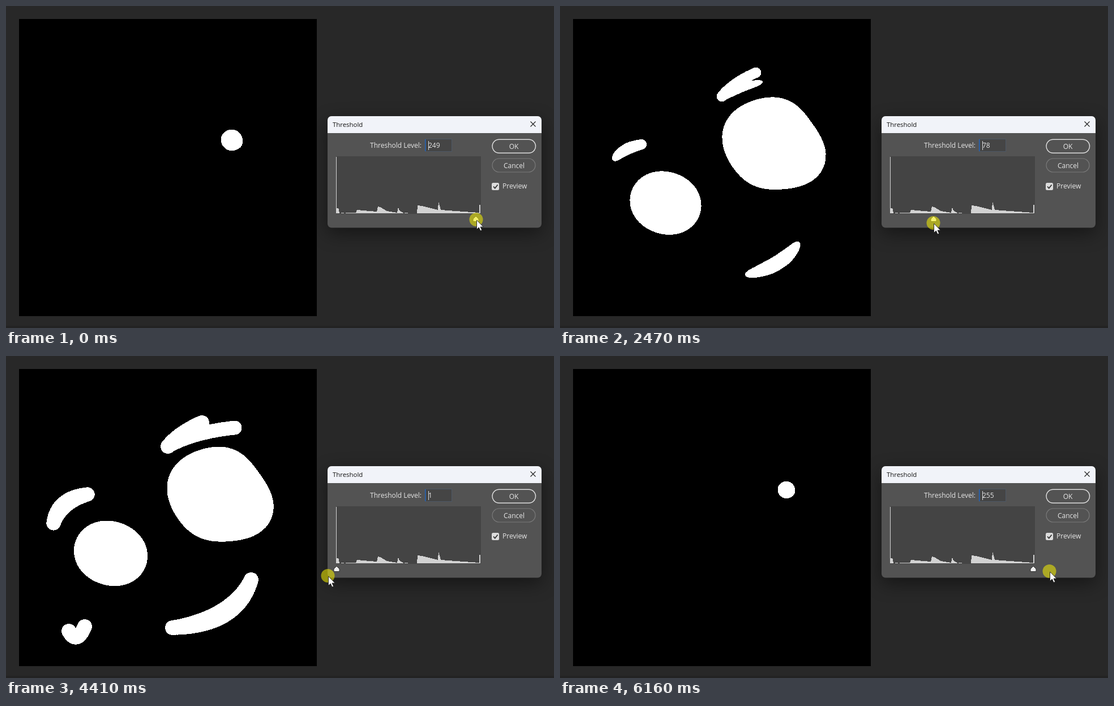
Recreate the animation shown at these times as an HTML page. Size 968 px wide and 570 px high, loop 6.23 s.

```html
<!DOCTYPE html>
<html lang="en">
<head>
<meta charset="utf-8">
<title>Threshold</title>
<style>
  html, body { margin: 0; width: 100%; height: 100%; overflow: hidden; background: #282828; }
  svg { display: block; }
  text { font: 12px "Open Sans", "Noto Sans", sans-serif; fill: #e6e6e6; }
  .crisp { shape-rendering: crispEdges; }
  .window { filter: drop-shadow(0 10px 16px rgba(0, 0, 0, .45)); }
</style>
</head>
<body>
<svg width="968" height="570" viewBox="0 0 968 570">
  <rect width="968" height="570" fill="#282828"/>
  <rect y="566" width="968" height="4" fill="#232323"/>
  <rect x="23" y="23" width="526" height="526"/>
  <path id="blobs" class="crisp" fill="#fff"/>

  <rect class="window" x="568" y="195" width="378" height="197.5" rx="7" fill="#535353"/>
  <path d="M568 225V202a7 7 0 0 1 7-7h364a7 7 0 0 1 7 7v23z" fill="#f1f3f9"/>
  <text x="577" y="214" style="font-size:11.4px;fill:#111">Threshold</text>
  <path d="M926.5 204.5l9 9m0-9l-9 9" stroke="#222" stroke-width="1.2"/>

  <text x="734" y="251" text-anchor="end">Threshold Level:</text>
  <rect x="740.5" y="235.5" width="47" height="22" fill="#454545" stroke="#4d5866"/>
  <rect x="740" y="236" width="1.5" height="21" fill="#2468c0"/>
  <text id="value" x="746" y="251"></text>
  <rect id="caret" x="746" y="239" width="1" height="16" fill="#ddd"/>

  <g class="crisp" fill="#d2d2d2">
    <rect x="583" y="266" width="256" height="102" fill="#444"/>
    <path d="M583 267h1v91h2l2 2 1 7h-6z"/>
    <path d="M592 366h5v1h-5zM600 366h18l2-5 35 3 2-9 4 1 12 7 18 3 2-10 2 6 8 5H600zM704 366h6v1h-6z"/>
    <path d="M726 367l1-14 8 1 28 7 1-15 4 15 68 5v-14h2v15z"/>
  </g>

  <rect x="859" y="236.200" width="76.500" height="24" rx="12" fill="none" stroke="#dedede" stroke-width="1.5"/>
  <rect x="859" y="270" width="76" height="24" rx="12" fill="none" stroke="#7a7a7a" stroke-width="1.2"/>
  <text x="897" y="253" text-anchor="middle">OK</text>
  <text x="897.5" y="287" text-anchor="middle">Cancel</text>
  <rect x="858" y="313" width="13" height="13" rx="2.5" fill="#dcdcdc"/>
  <path d="M861 319.500l2.700 3 4.800-6" fill="none" stroke="#333" stroke-width="1.8"/>
  <text x="877" y="323">Preview</text>

  <path id="slider" d="M0 372l5 5v4.500h-10V377z" fill="#f0f0f0" stroke="#333" stroke-linejoin="round"/>
  <g id="pointer">
    <circle cx="-.5" r="12" fill="#f5f000" fill-opacity=".55"/>
    <path d="M.5 1v16.500l3.800-3.600 2.700 6 2.600-1.200-2.600-5.700h5.200z" fill="#fff" stroke="#222" stroke-width=".9"/>
  </g>
</svg>
<script>
const $ = id => document.getElementById(id);
const { sin, cos, min, max, round, floor, PI } = Math;
const clamp = (v, lo = 0, hi = 1) => min(hi, max(lo, v));
const lerp = (a, b, f) => a + (b - a) * f;
const LOOP = 6230, STEP = 67, HOLD = 130, TURN = 4418, END = 6160;

// Rows of [key, ...values]; returns the values interpolated at x.
function sample(rows, x) {
  let i = 1;
  while (i < rows.length - 1 && rows[i][0] < x) i++;
  const a = rows[i - 1], b = rows[i];
  return a.map((v, k) => lerp(v, b[k], clamp((x - a[0]) / (b[0] - a[0])))).slice(1);
}

// Dragging down: time, level; the pointer overshoots the slider's range
const drag = [[63, 249], [730, 212], [1068, 179], [1872, 122], [2944, 44], [3410, -17], [3740, -17], [4020, -13]];

function pointerLevel(time) {
  if (time < TURN) return sample(drag, time)[0];
  return lerp(-13, 283, ((time - TURN) / (END - TURN)) ** 1.36);
}

// Eyes: rows of level, centre and mean radius; wobble shapes the rim
const eyes = [
  { rows: [[1, 377.5, 246.8, 88], [143, 376.5, 244, 83.6], [179, 380, 242, 66.3], [249, 399, 237.5, 19], [255, 400, 237, 15.3]],
    wobble: a => .045 * cos(2 * a) + .07 * sin(2 * a) + .025 * sin(3 * a) + .03 * sin(4 * a) },
  { rows: [[1, 185, 349.4, 61.2], [143, 187.8, 348, 57.9], [179, 203, 367.5, 26], [197, 203, 367.5, 0]],
    wobble: a => .065 * cos(2 * a) + .05 * sin(2 * a) }
];

// Brush strokes on a quadratic curve; strength tells where the paint is brightest
const strokes = [
  { curve: [[294, 481], [404, 471], [433, 396]], r: 13, bulge: 5, strength: t => 2 * min(t, 1 - t) },
  { curve: [[286, 160], [305, 136], [346, 118]], r: 13, bulge: 0, strength: () => 1 },
  { curve: [[286, 160], [330, 135], [404, 127]], r: 12.5, bulge: 0, strength: t => 1 - t },
  { curve: [[84, 296], [94, 255], [144, 245]], r: 12.7, bulge: 3, strength: t => t },
  { curve: [[111, 487], [125, 512], [139, 479]], r: 13.5, bulge: 0, strength: () => 0, faint: 8 }
];

function eye({ rows, wobble }, level) {
  const [cx, cy, r] = sample(rows, level);
  const points = Array.from({ length: 72 }, (_, i) => {
    const a = i * PI / 36, d = r * (1 + wobble(a) * min(1, r / 66));
    return `${cx + d * cos(a)} ${cy + d * sin(a)}`;
  });
  return `M${points.join('L')}Z`;
}

function stroke({ curve: [p, q, s], r, bulge, strength, faint = 49 }, level) {
  const dabs = 48;
  let path = '';
  for (let i = 0; i <= dabs; i++) {
    const t = i / dabs;
    const peak = min(117, faint + 83 * strength(t));
    if (level >= peak) continue;
    const size = (r + bulge * sin(PI * t)) * (1 - level / peak) ** .3;
    const [x, y] = [0, 1].map(k => lerp(lerp(p[k], q[k], t), lerp(q[k], s[k], t), t));
    path += `M${x - size} ${y}a${size} ${size} 0 1 1 ${2 * size} 0a${size} ${size} 0 1 1 ${-2 * size} 0z`;
  }
  return path;
}

function draw() {
  const t = performance.now() % LOOP;
  const k = floor((t - HOLD + 9) / STEP);
  const time = k < 0 ? 0 : HOLD + k * STEP;
  const raw = pointerLevel(time), level = clamp(round(raw), 1, 255);
  const y = 384 - 6 * clamp(1 - time / 660) + 5 * clamp((8 - raw) / 20) - 3 * clamp((raw - 255) / 28);
  $('blobs').setAttribute('d', [...eyes.map(e => eye(e, level)), ...strokes.map(s => stroke(s, level))].join(''));
  $('value').textContent = level;
  $('caret').setAttribute('opacity', time > 3740 && time < TURN - STEP / 2 ? 0 : 1);
  $('slider').setAttribute('transform', `translate(${round(583 + level * 253 / 255)})`);
  $('pointer').setAttribute('transform', `translate(${round(582 + raw)} ${round(y)})`);
  requestAnimationFrame(draw);
}
draw();
</script>
</body>
</html>
```
